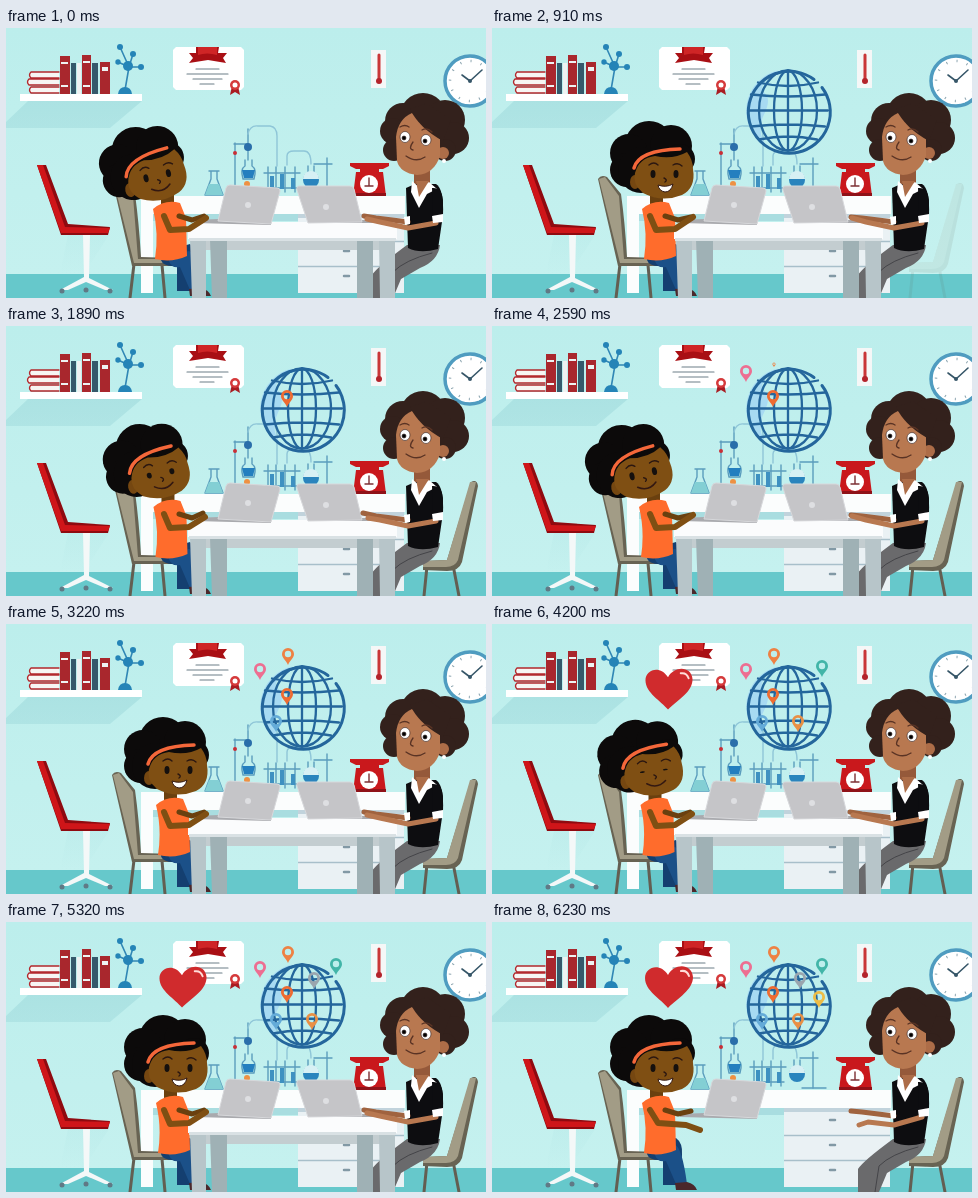
An HTML page for the animation above (6.3 s loop, 480 px wide and 270 px high).

```html
<!DOCTYPE html>
<html lang="en">
<head>
<meta charset="utf-8">
<title>Learning together</title>
<style>
html, body { margin: 0; width: 100%; height: 100%; overflow: hidden; }
svg { display: block; width: 100vw; height: 100vh; }
.line { fill: none; stroke-linecap: round; stroke-linejoin: round; }
</style>
</head>
<body>
<svg viewBox="0 0 480 270" preserveAspectRatio="none">
  <defs>
    <linearGradient id="wall" x2="0" y2="1"><stop stop-color="#bceeec"/><stop offset="1" stop-color="#c5f1ef"/></linearGradient>
    <linearGradient id="shade" x2="0" y2="1"><stop stop-color="#8fcfd3" stop-opacity=".4"/><stop offset="1" stop-color="#8fcfd3" stop-opacity="0"/></linearGradient>
    <path id="pin" d="M0 0C-2-5-6-7-6-11A6 6 0 0 1 6-11C6-7 2-5 0 0ZM0-7.800A3.200 3.200 0 1 0 0-14.200A3.200 3.200 0 1 0 0-7.800Z" fill-rule="evenodd"/>
  </defs>

  <!-- room -->
  <path fill="url(#wall)" d="M0 0H480V247H0Z"/>
  <path fill="#66c8cb" d="M0 246H480V270H0Z"/>
  <path fill="url(#shade)" d="M22 73H136L104 100H0V94ZM62 207H103L78 246H54Z"/>

  <!-- shelf -->
  <path fill="#fff" d="M14 66H136V73H14Z"/>
  <path fill="#f7f5f3" d="M24 44H53V50H24ZM22 51H53V57H22ZM24 59H53V65H24Z"/>
  <path class="line" stroke="#b3282d" stroke-width="1.3" d="M53 44H25Q22 47 25 50H53M53 51H23Q20 54 23 57H53M53 59H25Q22 62 25 65H53"/>
  <path fill="#a9272d" d="M54 28H64V66H54ZM76 27H85V66H76ZM94 34H104V66H94Z"/>
  <path fill="#35596b" d="M65 35H70V66H65ZM86 35H92V66H86Z"/>
  <path fill="#eef2f2" d="M71 35H75V66H71ZM55 34H62V36H55ZM77 33H84V35H77ZM96 39H102V43H96ZM55 57H62V59H55ZM77 57H84V59H77Z"/>
  <path class="line" stroke="#3187b5" stroke-width="1.6" d="M114 19L123 39L127 26M112 34L123 39L135 39M123 39L119 62"/>
  <g fill="#2584b7"><circle cx="114" cy="19" r="3"/><circle cx="127" cy="26" r="3"/><circle cx="112" cy="34" r="2.700"/><circle cx="135" cy="39" r="3"/><circle cx="122" cy="38" r="5"/><path d="M112 66Q113 59 119 59T126 66Z"/></g>

  <!-- wall objects -->
  <path fill="#fff" d="M170 19H235L238 22V59L235 62H170L167 59V22Z"/>
  <path fill="#a90f14" d="M190 19H213L212 25H221L217 30L220 35L202 32L183 35L187 30L183 25H190Z"/>
  <path fill="#cf2526" d="M192 19H211V27Q201 24 192 27Z"/>
  <path class="line" stroke="#6d7f87" stroke-width="1.200" d="M190 41H213M181 46H222M187 51H216M194 56H208"/>
  <path fill="#a91c22" d="M226 58L224 67L229 64L234 67L232 58Z"/><circle cx="229" cy="57" r="5" fill="#d53a3b"/><circle cx="229" cy="57" r="2.500" fill="#fff"/>
  <path fill="#f5f7f7" d="M365 22H380V60H365Z"/>
  <path class="line" stroke="#c93638" stroke-width="3" d="M373 27V53"/><circle cx="373" cy="53" r="3" fill="#b3232b"/>
  <circle cx="464" cy="53" r="25" fill="#fff" stroke="#4f9cc0" stroke-width="3.500"/>
  <circle cx="464" cy="53" r="20" fill="none" stroke="#8aa3ae" stroke-width="2.500" stroke-dasharray="1 9.470"/>
  <path class="line" stroke="#365668" stroke-width="1.600" d="M456 47L464 53L476 42"/><circle cx="464" cy="53" r="2" fill="#365668"/>

  <!-- red chair -->
  <path fill="#8f0a10" d="M31 137H40L62 196L104 199L102 207H55Z"/><path fill="#cf1519" d="M31 137H37L59 199L104 200L102 205H55Z"/>
  <path fill="#f4f8f8" d="M77 207H84L83 250L107 262H99L80 254L62 262H54L78 249Z"/>
  <g fill="#607985"><circle cx="56" cy="263" r="2.500"/><circle cx="80" cy="262" r="2.500"/><circle cx="104" cy="263" r="2.500"/></g>

  <!-- laboratory -->
  <g class="line" stroke="#5b9dbd" stroke-width="1.400">
    <path d="M205 143V151L199 167H217L211 151V143M203 143H213"/>
    <path d="M228 116H242M229 115V158M242 101V132M239 132V138Q234 141 237 151H248Q251 141 246 138V132"/>
    <path stroke="#8fc6d8" d="M242 106Q244 97 252 98H264Q271 99 271 108V138M281 137V128Q281 123 288 123H298Q305 123 305 136"/>
    <path d="M302 138V145M308 138V145M321 130V166M308 136H326"/>
    <path d="M258 145H294M260 160H292M262 139V164M270 139V164M279 139V164M289 139V164"/>
    <path d="M310 166H334"/>
  </g>
  <path fill="#83cfd4" d="M203 156H213L217 167H199Z"/><path fill="#247fbf" d="M236 142H249L247 150H238Z"/>
  <path stroke="#3e91c1" stroke-width="4" d="M266 148V161M276 146V161M287 150V161"/>
  <circle cx="305" cy="152" r="8" fill="#2a84bd"/><path fill="#d7f0f4" d="M297 151A8 8 0 0 1 313 151Z"/>
  <circle cx="242" cy="119" r="4" fill="#2a6eaa"/><circle cx="229" cy="125" r="2" fill="#c92f36"/><circle cx="241" cy="156" r="3" fill="#ee9143"/>
  <path fill="#c9181c" d="M344 135H383V138L377 141H373V144H377L380 168H347L350 144H354V141H350L344 138Z"/><path fill="#8f1218" d="M347 165H380V169H347Z"/>
  <circle cx="363" cy="156" r="9" fill="#fff"/><path class="line" stroke="#7d3034" stroke-width="1.400" d="M363 150V158M359 158H367"/>

  <!-- rear desk -->
  <path fill="#a9dde0" d="M147 186H292V193H147Z"/>
  <path fill="#fbfdfd" d="M135 168H399V186H147V265H135Z"/>
  <path fill="#eaf1f4" d="M292 186H398V265H292Z"/><path fill="#c1d3dc" d="M292 186H398V190H292Z"/>
  <path stroke="#a8bfca" stroke-width="1.500" d="M292 213.500H398M292 238.500H398"/>
  <path class="line" stroke="#8299a5" stroke-width="2.500" d="M338 198H343M338 223H343M338 248H343"/>

  <!-- globe -->
  <g id="globe">
    <path fill="#a7daf2" d="M-10-40A41 41 0 0 0-22 35Q-32 20-24 4T-24-18T-10-40Z"/>
    <g class="line" stroke="#24669c" stroke-width="2.300">
      <path stroke-width="3" d="M26-31A41 41 0 1 0 34-23"/>
      <ellipse rx="14" ry="40"/><ellipse rx="29" ry="40"/>
      <path d="M0-40V40M-40 0H40M-37-16Q0-12 37-16M-30-28Q0-21 30-28M-37 16Q0 12 37 16M-29 29Q0 23 29 29"/>
    </g>
  </g>
  <g id="pins"></g>
  <g id="heart"><path fill="#d02b2d" d="M-1 21C-8 12-24 4-24-9C-24-20-9-25-1-12C5-24 23-24 24-10C24 3 9 11-1 21Z"/><path class="line" stroke="#ffdcd8" stroke-width="2" d="M12-16Q18-17 20-11"/></g>

  <!-- seats -->
  <g id="rightChair"><path class="line" stroke="#635e52" stroke-width="3" d="M421 240L418 270M447 239L453 270"/><path fill="#686353" d="M465 156Q471 153 472 160L456 236Q453 245 441 245L417 244V235L441 234Z"/><path fill="#a29c86" d="M464 156L470 156L452 234Q449 241 440 241H417V235L441 234Z"/></g>
  <path class="line" stroke="#635e52" stroke-width="3" d="M128 236L124 270M156 237L159 270"/>
  <path fill="#686353" d="M106 151Q109 146 115 149L129 166Q133 195 135 229L168 230V238H126Z"/><path fill="#a29c86" d="M107 151L113 149L127 168L132 231L168 231V235H128Z"/>

  <!-- pupil -->
  <path fill="#143f70" d="M156 224L184 216Q191 221 190 233L188 263H171V238Q157 239 155 232Z"/>
  <path fill="#1b5088" d="M162 228L183 223Q190 225 195 262H184L174 239Q163 241 162 228Z"/><path fill="#4b282b" d="M183 261L195 260Q203 262 205 268H184Z"/>
  <g id="pupilBody"><path fill="#6a400f" d="M158 166H171V180H158Z"/><path fill="#ff6c2c" d="M150 181Q162 171 177 175L183 190L184 228Q169 235 152 231Q156 205 150 181Z"/></g>
  <g id="pupilHead">
    <g fill="#0c0a0a"><circle cx="-14" cy="-30" r="24"/><circle cx="-34" cy="-22" r="19"/><circle cx="8" cy="-29" r="21"/><circle cx="-36" cy="-5" r="17"/><circle cx="17" cy="-16" r="15"/><circle cx="-22" cy="-5" r="23"/></g>
    <ellipse cx="-28" cy="7" rx="5" ry="7" fill="#754711"/>
    <path fill="#7f4f13" d="M-28-2Q-24-17-8-19Q10-15 24-23Q30-15 30-6Q33 13 19 20Q-1 28-20 18Q-31 9-28-2Z"/>
    <path class="line" stroke="#f4673a" stroke-width="3.500" d="M-29-7Q-24-25 17-26"/>
    <path class="line" stroke="#2c1710" stroke-width="1.400" d="M-14-10Q-9-14-5-10M10-10Q15-13 19-9M1 3Q5 5 2 7"/>
    <g id="eyes" fill="#15100e"><ellipse cx="-10" cy="-1" rx="2.500" ry="4"/><ellipse cx="13" cy="-1" rx="2.500" ry="4"/></g>
    <path id="smile" class="line" stroke="#331812" stroke-width="1.500" d="M-7 11Q3 18 12 10"/>
    <path id="grin" fill="#fff" stroke="#331812" d="M-5 10Q3 13 10 9Q8 17 2 17Q-4 16-5 10Z"/>
  </g>

  <!-- teacher -->
  <path fill="#6a6a6c" d="M401 217H434Q432 233 414 240L395 251L387 270H366V247Q371 239 401 217Z"/><path class="line" stroke="#444448" d="M426 225Q399 232 387 244L383 270"/>
  <path fill="#95593a" d="M408 139H424V164H408Z"/>
  <path fill="#0d0d10" d="M400 160L409 156H430Q438 161 437 187L432 221Q414 226 402 220Z"/>
  <path fill="#fff" d="M406 153L414 160L423 154L431 161L421 166L413 180L405 164Z"/><path fill="#ad6d48" d="M410 153H423L413 169Z"/>
  <g fill="#33211c"><circle cx="417" cy="88" r="23"/><circle cx="397" cy="93" r="18"/><circle cx="387" cy="103" r="13"/><circle cx="388" cy="122" r="11"/><circle cx="439" cy="92" r="20"/><circle cx="447" cy="110" r="16"/><circle cx="439" cy="122" r="11"/></g>
  <circle cx="437" cy="125" r="6" fill="#ad6d48"/><circle cx="438" cy="133" r="2" fill="#fff"/>
  <path fill="#b87850" d="M390 109Q392 91 406 85Q418 92 434 111L434 128Q428 146 411 147Q394 145 391 133Z"/>
  <path fill="#33211c" d="M404 81Q413 100 437 113L445 92L421 75Z"/>
  <g id="teacherEyes" stroke="#322020" stroke-width=".600"><ellipse cx="399" cy="109" rx="5" ry="5.500" fill="#fff"/><ellipse cx="420" cy="112" rx="5" ry="5.500" fill="#fff"/><circle cx="398" cy="110" r="2"/><circle cx="419" cy="113" r="2"/></g>
  <path class="line" stroke="#5a3324" stroke-width="1.300" d="M394 99Q399 96 403 99M416 102Q421 99 426 104M407 114Q402 121 407 122M400 128Q410 135 419 129"/>

  <!-- work table -->
  <g id="table">
    <path fill="#c3cdd0" d="M198 211H376V222H198Z"/>
    <path fill="#9fb1b5" d="M204 211H221V270H206ZM351 211H367V270H351Z"/><path fill="#b7c5c9" d="M184 211H200V270H186ZM373 211H389V270H374Z"/>
    <path fill="#fbfcfd" d="M190 194H382L391 199V211H182V199Z"/><path fill="#d9e1e4" d="M183 210H390V213H183Z"/>
  </g>
  <g id="rightLaptop"><path fill="#a9aaae" d="M302 194L354 192L383 192L386 195H303Z"/><path fill="#c5c5c8" stroke="#d7d8db" d="M294 158H344Q347 158 348 161L356 194L302 195L291 162Q290 158 294 158Z"/><circle cx="320" cy="179" r="3" fill="#dedfe2"/></g>
  <path fill="#a9aaae" d="M187 192L213 191L265 195V197L188 195Z"/><path fill="#c5c5c8" stroke="#d7d8db" d="M224 157L271 160Q274 160 274 163L265 196L212 193L220 160Q221 157 224 157Z"/><circle cx="242" cy="177" r="3" fill="#dedfe2"/>

  <!-- typing arms -->
  <g class="line" stroke-width="5"><path id="pupilFar" stroke="#6a400f"/><path id="pupilNear" stroke="#7f4f13" stroke-width="6"/><path id="teacherFar" stroke="#a0633f"/><path id="teacherNear" stroke="#b87850"/></g>
  <path fill="#0d0d10" d="M426 160Q437 159 437 175L437 190H427Z"/><path fill="#fff" d="M426 188L437 186V194L427 195ZM398 189L404 188V196L399 197Z"/>
</svg>
<script>
const LOOP = 6300, STEP = 70, END = 6160, SWAY = 2380;
const $ = id => document.getElementById(id);
const clamp = x => Math.max(0, Math.min(1, x));
const ramp = (t, start, length) => {
  const x = clamp((t - start) / length);
  return x * x * (3 - 2 * x);
};
const show = (id, on) => $(id).setAttribute('visibility', on ? 'visible' : 'hidden');
const move = (el, x, y, scale = 1, angle = 0) =>
  el.setAttribute('transform', `translate(${x} ${y}) rotate(${angle}) scale(${scale})`);

// tip x, tip y, colour, arrival
const pins = [
  [281, 81, '#ee6b31', 1540], [254, 56, '#ed6e91', 2100],
  [282, 41, '#ee8143', 2520], [270, 108, '#64abd8', 2940],
  [330, 53, '#42b5a8', 3430], [306, 108, '#e99045', 3780],
  [308, 67, '#9ba5ae', 4760], [327, 86, '#edbc45', 5670]
].map(([x, y, color, start]) => {
  const el = document.createElementNS('http://www.w3.org/2000/svg', 'use');
  el.setAttribute('href', '#pin');
  el.setAttribute('fill', color);
  $('pins').append(el);
  return { el, x, y, start };
});

const pop = (t, start) => ramp(t, start, 210);

function draw(t) {
  // The pupil leans in, sits up, then blinks on the way back down.
  const phase = t % SWAY;
  const lean = 1 - ramp(phase, 210, 350) + ramp(phase, 1680, 280);
  const lids = Math.min(1, .2 + Math.abs(phase - 1820) / 130);
  const tap = Math.sin(t * Math.PI / 140), working = t < END;

  move($('pupilHead'), 171 - 21 * lean, 147 + 2 * lean, 1, -13 * lean);
  move($('pupilBody'), -3 * lean, 0);
  $('eyes').setAttribute('transform', `translate(0 ${lids - 1}) scale(1 ${lids})`);
  show('smile', lean > .35);
  show('grin', lean <= .35);

  move($('globe'), 296, 82.5, pop(t, 560));
  for (const p of pins) move(p.el, p.x, p.y, pop(t, p.start));
  move($('heart'), 177, 65, pop(t, 3920) * (1 + .02 * Math.sin(t / 180)));
  $('rightChair').setAttribute('opacity', clamp((t - 880) / 280));

  show('table', working);
  show('rightLaptop', working);
  $('pupilFar').setAttribute('d', `M173 188L186 192L${198 + tap} ${188 + tap}`);
  $('pupilNear').setAttribute('d', working
    ? `M158 188L164 202L183 201L${200 + tap} ${190 - tap}`
    : 'M158 188L166 201L194 203L208 208');
  $('teacherFar').setAttribute('d', `M402 194L370 190L${358 + tap} ${188 + tap}`);
  $('teacherNear').setAttribute('d', working
    ? `M430 195L402 200L374 194L${361 - tap} ${191 - tap}`
    : 'M430 195L402 203L376 200L367 203');
}

function frame(now) {
  draw(Math.floor(now % LOOP / STEP) * STEP);
  requestAnimationFrame(frame);
}
requestAnimationFrame(frame);
</script>
</body>
</html>
```
